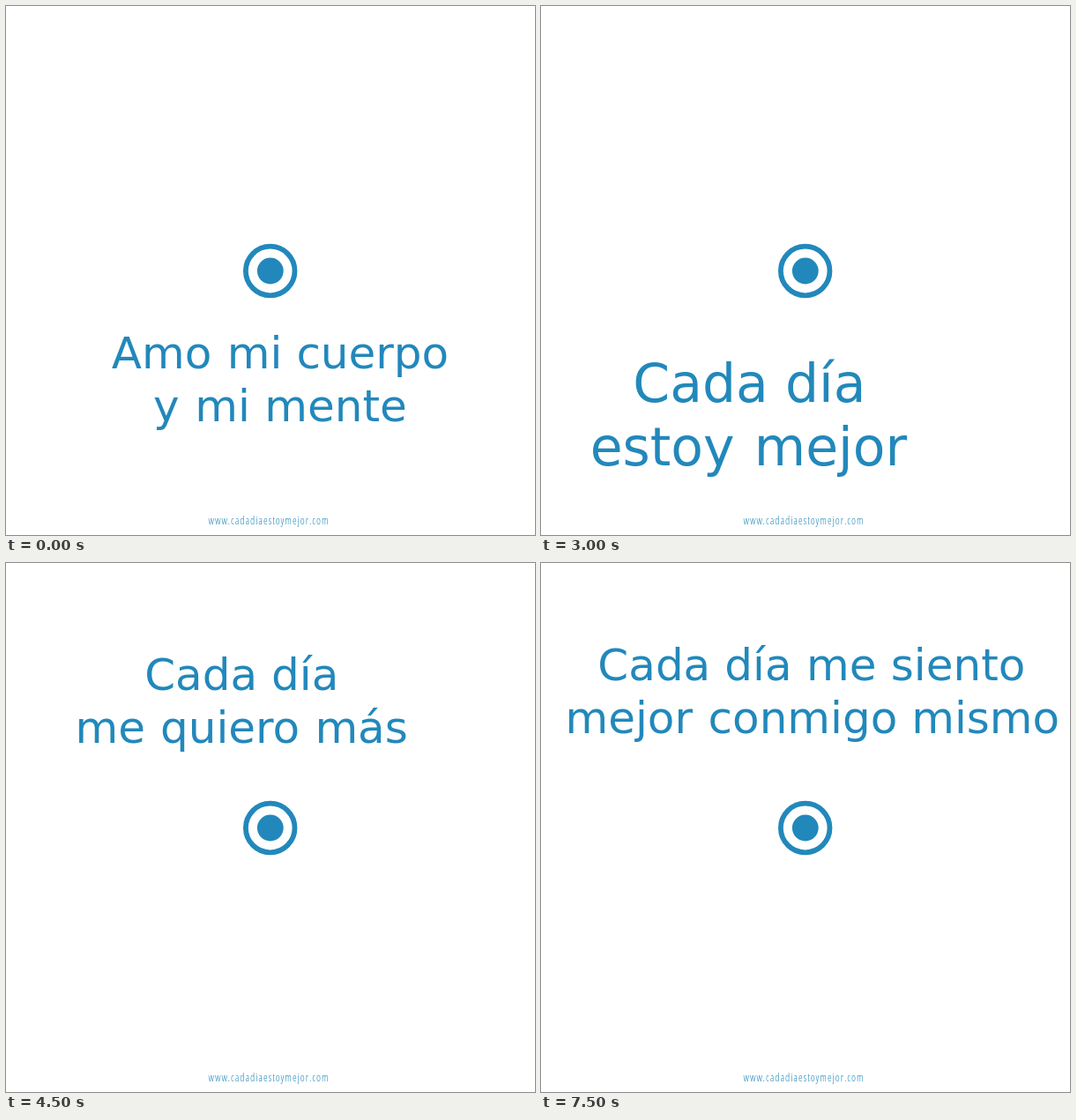
An HTML page for the animation above (8 s loop, 600x600 px).

```html
<!DOCTYPE html>
<html lang="es">
<head>
<meta charset="utf-8">
<title>Afirmaciones</title>
<style>
  html, body { margin: 0; width: 100%; height: 100%; overflow: hidden; background: #fff; }
  svg { display: block; width: 100%; height: 100%; }
  text { fill: #28b; text-anchor: middle; font-family: "DejaVu Sans", Verdana, sans-serif; }
  #address { font: 300 12px "Open Sans", "Noto Sans", sans-serif; font-stretch: 75%; text-anchor: start; }
</style>
</head>
<body>
<svg viewBox="0 0 600 600">
  <circle cx="299.7" cy="300.5" r="27.8" fill="none" stroke="#28b" stroke-width="5.8"/>
  <circle cx="299.8" cy="300.5" r="14.9" fill="#28b"/>
  <g id="phrase"></g>
  <text id="address" x="229.5" y="588">www.cadadiaestoymejor.com</text>
</svg>
<script>
const LOOP = 8000, HOLD = 1500, ADDRESS_WIDTH = 137;

// Each line: baseline, words, centre of each word
const phrases = [
  { size: 50, lines: [
    [411, "Amo mi cuerpo", [176.6, 282, 415.8]],
    [471, "y mi mente", [181.9, 245.5, 374.1]]] },
  { size: 50, lines: [
    [91, "Cada día confío más", [110.3, 228.4, 358.3, 503.1]],
    [151, "en mí mismo", [168.8, 248.3, 380.8]]] },
  { size: 60, lines: [
    [449, "Cada día", [181, 322.8]],
    [521, "estoy mejor", [137.6, 328.4]]] },
  { size: 50, lines: [
    [144, "Cada día", [221.1, 339.2]],
    [204, "me quiero más", [118.3, 254.1, 403.1]]] },
  { size: 50, lines: [
    [397, "Disfruto siendo", [213.8, 412.2]],
    [457, "tal como soy", [175.7, 292.8, 421]]] },
  { size: 50, lines: [
    [133, "Cada día me siento", [128.3, 246.4, 340.7, 473.1]],
    [193, "mejor conmigo mismo", [99.7, 296.9, 504.2]]] },
];

const phraseGroup = document.getElementById("phrase");
const address = document.getElementById("address");
const tracking = (ADDRESS_WIDTH - address.getComputedTextLength()) / address.textContent.length;
address.style.letterSpacing = tracking + "px";

function markup({ size, lines }) {
  const words = lines.flatMap(([y, line, centres]) =>
    line.split(" ").map((word, i) => `<text x="${centres[i]}" y="${y}">${word}</text>`));
  return `<g font-size="${size}">${words.join("")}</g>`;
}

let shown = -1;
let start;

function draw(now) {
  start ??= now;
  const index = Math.floor(((now - start) % LOOP) / HOLD);
  if (index !== shown) {
    shown = index;
    phraseGroup.innerHTML = markup(phrases[index]);
  }
  requestAnimationFrame(draw);
}
draw(performance.now());
</script>
</body>
</html>
```
